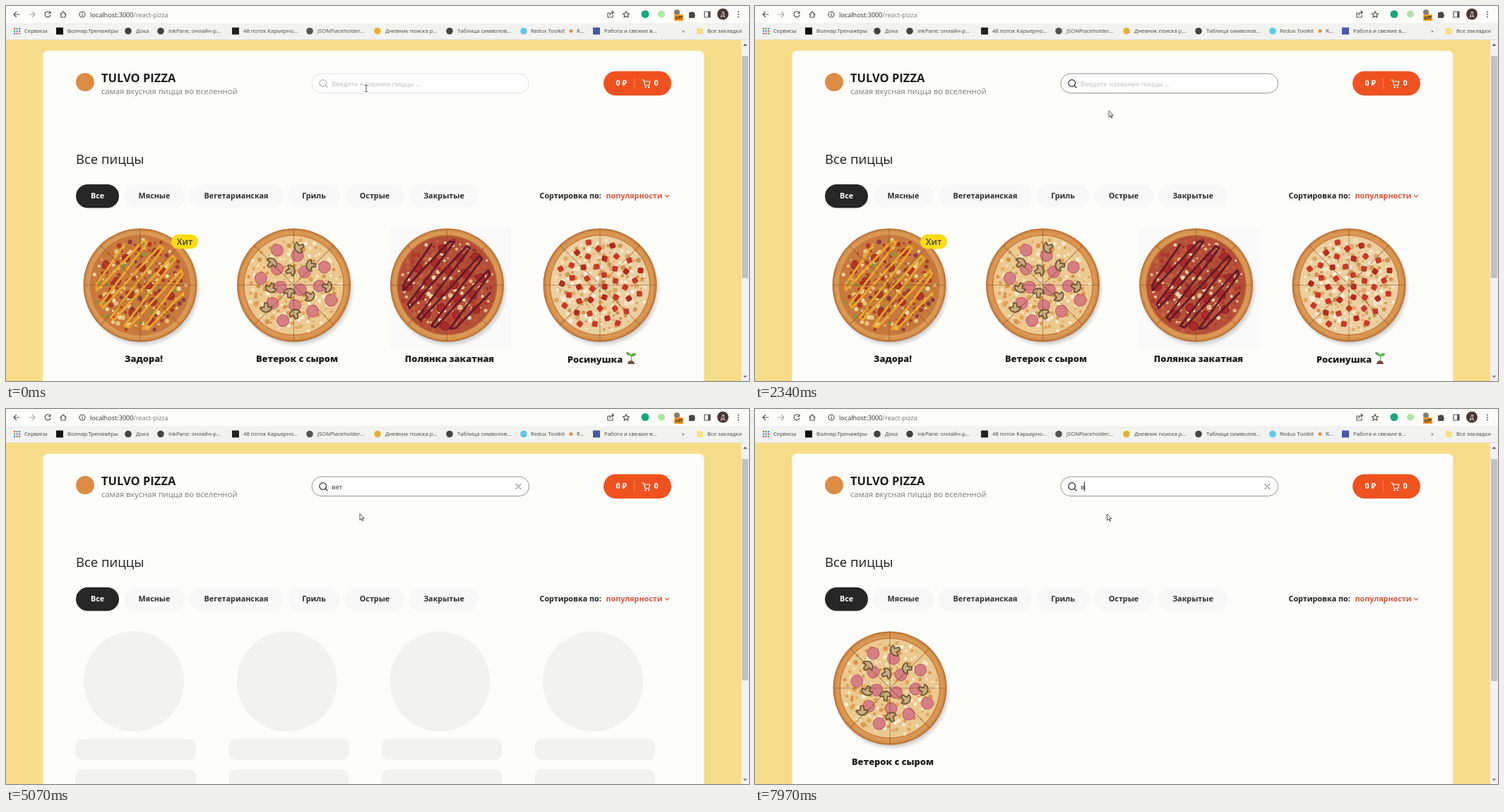
Recreate the animation shown at these times as an HTML page. Size 1052x532 px, loop 8 s.

```html
<!DOCTYPE html>
<html lang="ru">
<head>
<meta charset="utf-8">
<title>Пиццы</title>
<style>
  html, body { margin: 0; width: 100%; height: 100%; overflow: hidden; background: #f7dd8a; }
  svg { display: block; width: 1052px; height: 532px; font-family: "Open Sans", "Noto Sans", sans-serif; }
  .mid { text-anchor: middle; }
  .bold { font-weight: 700; font-size: 10.8px; }
  .line { fill: none; stroke: #555; stroke-width: 1.2; stroke-linecap: round; stroke-linejoin: round; }
  .name { font-weight: 800; font-size: 12.8px; text-anchor: middle; }
</style>
</head>
<body>
<svg viewBox="0 0 1052 532" fill="#1d1d1d">
  <defs>
    <radialGradient id="crust">
      <stop offset=".85" stop-color="#b05a26"/>
      <stop offset=".9" stop-color="#dc9a55"/>
      <stop offset=".95" stop-color="#d8954f"/>
      <stop offset="1" stop-color="#b36c31"/>
    </radialGradient>
    <radialGradient id="shade">
      <stop offset=".88" stop-color="#777" stop-opacity=".45"/>
      <stop offset="1" stop-color="#777" stop-opacity="0"/>
    </radialGradient>
    <linearGradient id="shimmer" gradientUnits="userSpaceOnUse" x1="0" x2="191">
      <stop stop-color="#f2f2f1"/><stop stop-color="#e8e8e8"/><stop stop-color="#f2f2f1"/>
    </linearGradient>
  </defs>

  <rect width="1052" height="532" fill="#f7dd8a"/>
  <path d="M52.300 532V70.500a7 7 0 0 1 7-7H981.300a7 7 0 0 1 7 7V532z" fill="#fdfdfc"/>

  <g id="browser">
    <rect width="1052" height="48" fill="#f2f3f1"/>
    <rect width="1052" height="24" fill="#fcfcfb"/>
    <rect y="47" width="1052" height="1" fill="#e3e3e1"/>
    <g class="line">
      <path d="M19 12h-8m3.500-3.500L11 12l3.500 3.500"/>
      <path d="M33 12h8m-3.500-3.500L41 12l-3.500 3.500" stroke="#aaa"/>
      <path d="M62.500 9.500a4 4 0 1 0 .5 3.500m0-5v2.500h-2.500"/>
      <path d="M77 12l4-4 4 4m-7-1v5h6v-5"/>
      <circle cx="108" cy="12" r="4"/><path d="M108 11.500v2.500m0-4.200v.1"/>
      <path d="M855 10h-3v6h7v-3m-4 0c0-3 2-4 5-4m-2-2l2.500 2-2.500 2"/>
      <path d="M878 7.500l1.400 3 3.200.3-2.400 2.200.7 3.200-2.900-1.700-2.900 1.700.7-3.200-2.400-2.200 3.200-.3z"/>
      <path d="M989 8h8v8h-8z"/>
    </g>
    <path d="M994 8h3v8h-3z" fill="#555"/>
    <path d="M967 9h3a1.700 1.700 0 0 1 3 0h2v3a1.700 1.700 0 0 1 0 3v2h-8z" fill="#484848"/>
    <text x="119" y="15.500" font-size="9.150" fill="#333">localhost:3000<tspan fill="#777">/react-pizza</tspan></text>
    <circle cx="905" cy="11.500" r="5.500" fill="#18a77b"/>
    <circle cx="928" cy="11.500" r="5" fill="#aee6a8"/>
    <circle cx="950" cy="9" r="4" fill="#887c70"/>
    <rect x="946" y="12" width="13" height="9" rx="1.500" fill="#f39a1d"/>
    <text class="mid" x="952.500" y="19.300" font-size="7.500" font-weight="600">off</text>
    <circle cx="1015" cy="11.500" r="8" fill="#4a3835"/>
    <text class="mid" x="1015" y="14.700" font-size="8.500" fill="#fff">Д</text>
    <g fill="#555"><circle cx="1037" cy="8.500" r="1"/><circle cx="1037" cy="12" r="1"/><circle cx="1037" cy="15.500" r="1"/></g>
    <path d="M978 31h4l1 1h4v8h-9z" fill="#f8df83"/>
  </g>

  <g id="scrollbar">
    <rect x="1041" y="48" width="11" height="484" fill="#f2f2f2"/>
    <rect id="thumb" x="1042" y="71" width="9" height="315" fill="#c1c1c1"/>
    <path d="M1043.500 56.500l3-3 3 3z" fill="#555"/><path d="M1043.500 524.500l3 3 3-3z" fill="#777"/>
  </g>

  <g id="header">
    <circle cx="112" cy="108" r="13" fill="#dd8c45"/>
    <text x="135" y="107.500" font-size="16.500" font-weight="700">TULVO PIZZA</text>
    <text x="135" y="125" font-size="11.200" fill="#7b7b7b">самая вкусная пицца во вселенной</text>

    <rect id="field" x="433" y="96" width="307.500" height="27.500" rx="13.750" fill="#fff"/>
    <path id="lens" class="line" d="M453.500 109.500a4.800 4.800 0 1 0-9.600 0 4.800 4.800 0 1 0 9.600 0m-1.400 3.400l3 3"/>
    <text id="hint" x="461" y="113.500" font-size="9.400" fill="#bcbcbc">Введите название пиццы ...</text>
    <text id="query" x="461" y="113.500" font-size="9.500" fill="#333"></text>
    <path id="squiggle" d="M461 115.500l1.500-1 1.500 1 1.500-1 1.500 1 1.500-1 1.500 1 1.500-1 1.500 1 1.500-1 1.500 1" fill="none" stroke="#e04a4a" stroke-width=".8"/>
    <path id="clear" class="line" d="M722 106.500l7 7m0-7l-7 7" style="stroke:#999"/>
    <rect id="caret" y="103.500" width="1" height="13" fill="#111"/>

    <rect x="846" y="92.500" width="96" height="34.500" rx="17.250" fill="#f0521f"/>
    <path d="M889.500 102v16" stroke="#f47f52"/>
    <g class="bold" fill="#fff"><text x="863.500" y="113">0 ₽</text><text x="917.500" y="113">0</text></g>
    <path class="line" d="M901 105h2l1.800 7.500h5.700l1.300-5.500h-8.200" style="stroke:#fff"/>
    <circle cx="905.500" cy="115" r="1.200" fill="#fff"/><circle cx="910" cy="115" r="1.200" fill="#fff"/>
  </g>

  <text x="99" y="224.300" font-size="18.500" font-weight="500">Все пиццы</text>
  <g id="tabs" class="bold"></g>
  <g class="bold">
    <text x="755.500" y="272.500">Сортировка по:</text>
    <text x="849.500" y="272.500" fill="#d8573a">популярности</text>
    <path class="line" d="M933.500 268.500l2.500 2.500 2.500-2.500" style="stroke:#d8573a"/>
  </g>

  <g id="menu"></g>
  <g id="found"></g>
  <g id="skeleton" fill="url(#shimmer)"></g>

  <path id="beam" d="M-2-4.500h1.500l.5.500.5-.500H2M0-4V4M-2 4.500h1.500L0 4l.5.500H2" fill="none" stroke="#444" stroke-width=".9"/>
  <path id="arrow" d="M0 0v9l2.100-1.900 1.500 3.200 1.300-.6-1.500-3.100h2.900z" fill="#fff" stroke="#222" stroke-width=".8"/>
</svg>

<script>
const LOOP = 8000;
const $ = id => document.getElementById(id);
const show = (id, on) => $(id).style.display = on ? '' : 'none';

function seeded(seed) {
  return () => (seed = (seed * 16807) % 2147483647) / 2147483647;
}

const dot = (x, y, r, fill) =>
  `<circle cx="${x.toFixed(1)}" cy="${y.toFixed(1)}" r="${r.toFixed(1)}" fill="${fill}"/>`;

// Evenly spread points on a disc, placed along a golden-angle spiral.
function spread(count, radius, turn, draw) {
  let out = '';
  for (let i = 0; i < count; i++) {
    const r = radius * Math.sqrt((i + .5) / count), a = i * 2.39996 + turn;
    out += draw(r * Math.cos(a), r * Math.sin(a), i);
  }
  return out;
}

function flecks(count, colors, random) {
  return spread(count, 66, 1, (x, y) =>
    dot(x + random() * 6 - 3, y + random() * 6 - 3, 1.2 + random() * 2.4, colors[Math.floor(random() * colors.length)]));
}

// One thread of sauce running back and forth with rounded turns.
function drizzle(color, width) {
  const legs = 10;
  let points = '';
  for (let i = 0; i < legs * 2; i++) {
    const across = -54 + i * 108 / (legs * 2 - 1);
    const along = Math.sqrt(62 * 62 - across * across) * ((i + 1) & 2 ? -1 : 1);
    points += `${(across * .77 + along * .64).toFixed(1)},${(across * .64 - along * .77).toFixed(1)} `;
  }
  return `<polyline points="${points}" fill="none" stroke="${color}" stroke-width="${width}" stroke-linejoin="round" stroke-linecap="round"/>`;
}

const salami = (color, rim, size) => (x, y) => dot(x, y, size, rim) + dot(x, y, size - 1.2, color);

const mushroom = (x, y, i) =>
  `<path transform="translate(${x.toFixed(1)} ${y.toFixed(1)}) rotate(${i * 67})" d="M-8 1a8 7 0 0 1 16 0l-5 0-1 6h-4l-1-6z" fill="#c9ac80" stroke="#6d5534" stroke-width="1.800"/>`;

const cube = (x, y, i) =>
  `<rect x="-4" y="-4" width="8" height="8" rx="2" transform="translate(${x.toFixed(1)} ${y.toFixed(1)}) rotate(${i * 37})" fill="${i % 3 ? '#cf3825' : '#b8291c'}"/>`;

const recipes = [
  { base: '#c9793c', specks: ['#b1382a', '#e9c27d', '#a8402a', '#83973c', '#f0d69a', '#8a3a45'],
    top: () => spread(13, 57, 0, salami('#b4362a', '#962d22', 6)) + drizzle('#eba82a', 3) },
  { base: '#ebc98f', specks: ['#f6e6c2', '#e0a558', '#f8edcf', '#d8954a'],
    top: () => spread(14, 58, .6, salami('#d67f82', '#c0606a', 9)) + spread(10, 55, 2.1, mushroom) },
  { base: '#b54f38', specks: ['#a22c28', '#e5b888', '#b03a30', '#efd3a8', '#c4603c'],
    top: () => spread(20, 59, 0, salami('#ab2a2a', '#8f2222', 6.5)) + drizzle('#651b29', 3) },
  { base: '#ebcfa0', specks: ['#faf0dc', '#ddaa66', '#f6e5c6', '#cf954f'],
    top: () => spread(42, 63, .3, cube) }
];

function pizza(kind, x) {
  const { base, specks, top } = recipes[kind];
  const cuts = [0, 45, 90, 135].map(a => `<path d="M-79 0H79" transform="rotate(${a})"/>`).join('');
  return `<g transform="translate(${x} 396)">
    <circle cx="3" cy="5" r="83" fill="url(#shade)"/><circle r="80.500" fill="url(#crust)"/>
    <circle r="70" fill="${base}"/>${flecks(190, specks, seeded(kind * 97 + 11))}${top()}
    <g stroke="#7d431e" stroke-opacity=".5">${cuts}</g></g>`;
}

const named = (kind, x, center, name) =>
  pizza(kind, x) + `<text class="name" x="${center}" y="${kind === 3 ? 506 : 505}">${name}</text>`;

$('menu').innerHTML =
  named(0, 190, 195, 'Задора!') +
  named(1, 407.5, 412, 'Ветерок с сыром') +
  '<rect x="544" y="315" width="171" height="171" fill="#fbfafa"/>' +
  named(2, 624.5, 628, 'Полянка закатная') +
  named(3, 841, 834, 'Росинушка') + `
  <rect x="234" y="324" width="38" height="20.500" rx="10" fill="#f9dc12"/>
  <text class="mid" x="253" y="338.500" font-size="12.500" font-weight="600" fill="#444">Хит</text>
  <path d="M885 503c0-4 0-5-1-7-4 0-6-2-6-5 4 0 6 1 7 4 1-2 3-3 7-2 0 3-2 4-6 4v6z" fill="#5bb04a"/>
  <path d="M880 508a5 5 0 0 1 10 0z" fill="#73503a"/>`;
$('found').innerHTML = named(1, 191, 195, 'Ветерок с сыром');

$('tabs').innerHTML = [
  ['Все', 99, 160], ['Мясные', 167, 253], ['Вегетарианская', 260, 392],
  ['Гриль', 399, 473], ['Острые', 480, 564], ['Закрытые', 571, 669]
].map(([label, left, right], i) => `
  <rect x="${left}" y="253" width="${right - left}" height="33.500" rx="16.700" fill="${i ? '#f8f8f8' : '#262626'}"/>
  <text class="mid" x="${(left + right) / 2}" y="273" fill="${i ? '#2c2c2c' : '#fff'}">${label}</text>`).join('');

$('skeleton').innerHTML = [0, 1, 2, 3].map(i => `
  <g transform="translate(${98.5 + i * 216.7} 0)"><circle cx="82.500" cy="386.500" r="71"/>
  <rect y="468" width="170.500" height="30" rx="10"/><rect y="511" width="170.500" height="30" rx="10"/></g>`).join('');

// Bookmarks: [label, text x, icon centre, icon colour, square icon]
const bookmarks = [
  ['Волнар.Тренажёры', 87, 76, '#111', true], ['Дока', 184, 173, '#444'],
  ['InkPane: онлайн-р...', 230, 219, '#444'], ['48 поток Карьерно...', 336, 325, '#222', true],
  ['JSONPlaceholder...', 441, 430, '#555'], ['Дневник поиска р...', 537, 526, '#e6b22e'],
  ['Таблица символов...', 639, 628, '#444'], ['Redux Toolkit', 743, 733, '#5cc9e8'],
  ['R...', 808, 800, '#f08a3c'], ['Работа и свежие в...', 847, 836, '#4a56a6', true]
];
const label = (x, text) => `<text x="${x}" y="38.200" font-size="7.700" fill="#444">${text}</text>`;
let strip = label(26, 'Сервисы') + label(957, '»') + label(993, 'Все закладки');
for (let i = 0; i < 9; i++)
  strip += `<rect x="${11 + i % 3 * 3.5}" y="${31 + Math.floor(i / 3) * 3.5}" width="2.200" height="2.200" fill="${['#e2574c', '#55a868', '#4b83dd'][(i + Math.floor(i / 3)) % 3]}"/>`;
for (const [text, x, cx, color, square] of bookmarks) {
  strip += label(x, text) + (square
    ? `<rect x="${cx - 5}" y="30.500" width="10" height="10" fill="${color}"/>`
    : dot(cx, 35.5, text === 'R...' ? 2.5 : 4.8, color));
}
$('browser').insertAdjacentHTML('beforeend', strip);

const FOCUS = 300;
const edits = [[0, ''], [3220, 'в'], [3475, 'ве'], [4500, 'вет'], [7600, 'ве'], [7790, 'в']];
const loads = [[3725, 4500], [4750, 5480]];
const pointer = [[0, 510, 117], [400, 510, 117], [900, 503, 153], [6100, 503, 153], [6400, 500.5, 153.5], [LOOP, 500.5, 153.5]];

function pointerAt(t) {
  const i = pointer.findIndex(p => p[0] > t);
  const [t0, x0, y0] = pointer[i - 1], [t1, x1, y1] = pointer[i];
  const k = (t - t0) / (t1 - t0), ease = k * k * (3 - 2 * k);
  return [x0 + (x1 - x0) * ease, y0 + (y1 - y0) * ease];
}

function render(t) {
  const focused = t >= FOCUS;
  const [typedAt, text] = edits.filter(e => e[0] <= t).pop();
  const loading = loads.find(([start, end]) => t >= start && t < end);

  $('field').setAttribute('stroke', focused ? '#93938c' : '#e2e2d8');
  $('lens').style.stroke = focused ? '#222' : '#b5b5b5';
  $('query').textContent = text;
  show('hint', !text);
  show('clear', text);
  show('squiggle', text === 'вет' && t >= 5480);
  show('caret', focused && (t - Math.max(FOCUS, typedAt)) % 1060 < 530);
  $('caret').setAttribute('x', 460.5 + (text ? $('query').getComputedTextLength() : 0));

  show('menu', t < loads[0][0]);
  show('found', t >= loads[0][0] && !loading);
  show('skeleton', loading);
  $('thumb').setAttribute('height', loading ? 314 : 315);
  if (loading) {
    const sweep = 3 * Math.max(0, ((t - loading[0]) % 2000 - 500) / 1500);
    document.querySelectorAll('#shimmer stop').forEach((stop, i) =>
      stop.setAttribute('offset', Math.min(1, Math.max(0, sweep - 2 + i))));
  }

  const [x, y] = pointerAt(t), overField = y < 124;
  show('beam', overField);
  show('arrow', !overField);
  $('beam').setAttribute('transform', `translate(${x} ${y})`);
  $('arrow').setAttribute('transform', `translate(${x - 2} ${y - 4.5})`);
}

const begin = performance.now();
function tick() {
  render((performance.now() - begin) % LOOP);
  requestAnimationFrame(tick);
}
tick();
</script>
</body>
</html>
```
